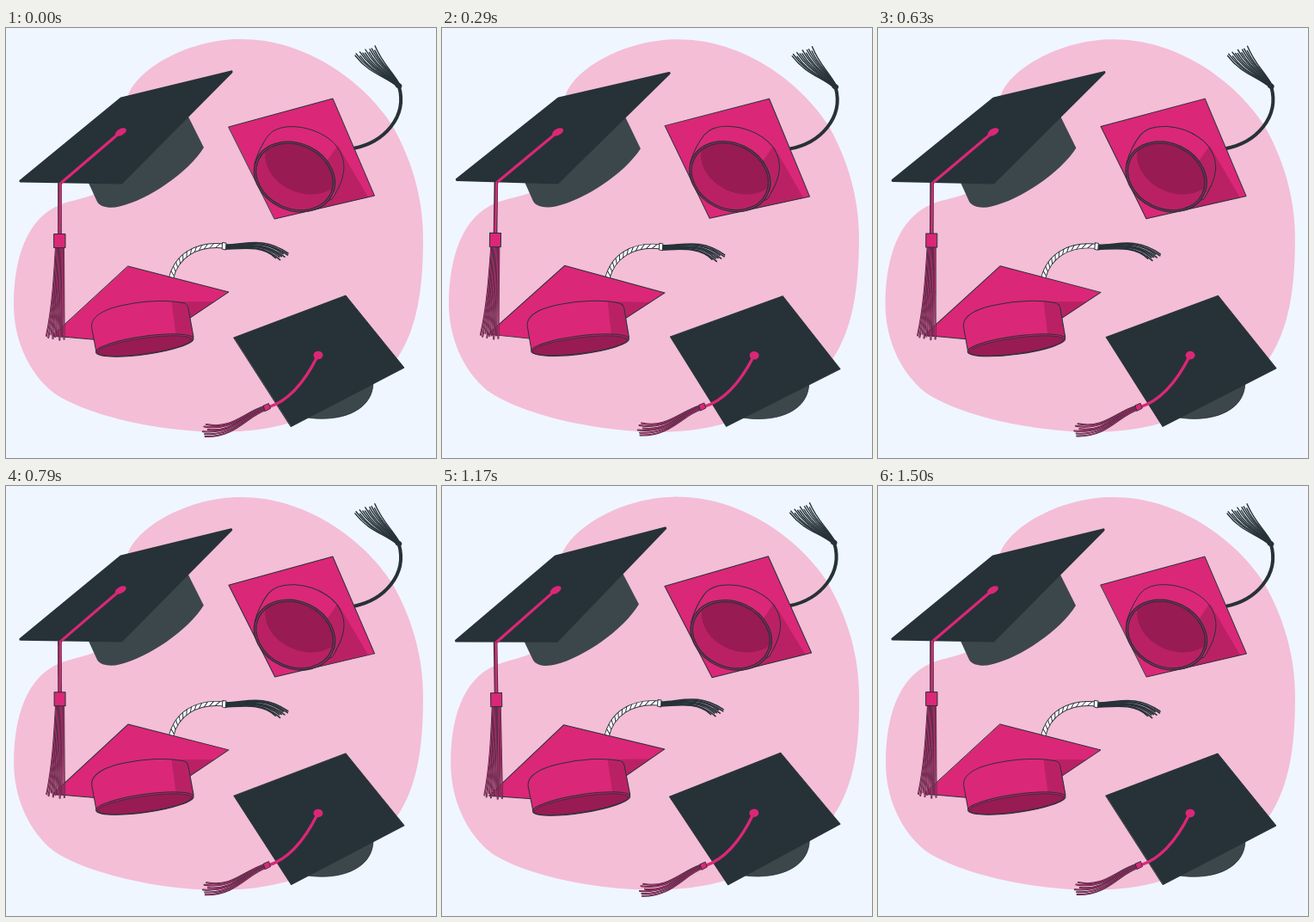
Write an HTML page with a canvas that moves like this. It is 500 px wide and 500 px high and loops after 1540 ms.

```html
<!DOCTYPE html>
<html lang="en">
<head>
<meta charset="utf-8">
<title>Graduation caps</title>
<style>
  html, body { margin: 0; width: 100%; height: 100%; overflow: hidden; background: #eff6ff; }
  canvas { display: block; width: 500px; height: 500px; }
</style>
</head>
<body>
<canvas id="stage" width="500" height="500"></canvas>
<script>
const ctx = document.getElementById('stage').getContext('2d');
const SKY = '#eff6ff', BLOB = '#f4bed6', PINK = '#db2777', SHADE = '#ba2165',
      DEEP = '#991b53', DARK = '#263238', GREY = '#3c474c', WHITE = '#fff';

const FPS = 24, FRAMES = 37, SWING_FRAMES = 36;
const MAX_ANGLE = Math.PI / 180;

function shape(d, fill, stroke, width = 1) {
  const path = new Path2D(d);
  if (fill) { ctx.fillStyle = fill; ctx.fill(path); }
  if (stroke) { ctx.strokeStyle = stroke; ctx.lineWidth = width; ctx.stroke(path); }
}

function oval(x, y, rx, ry, degrees, fill, stroke, width = 1) {
  ctx.beginPath();
  ctx.ellipse(x, y, rx, ry, degrees * Math.PI / 180, 0, 2 * Math.PI);
  if (fill) { ctx.fillStyle = fill; ctx.fill(); }
  if (stroke) { ctx.strokeStyle = stroke; ctx.lineWidth = width; ctx.stroke(); }
}

function clipped(d, draw) {
  ctx.save();
  ctx.clip(new Path2D(d));
  draw();
  ctx.restore();
}

// Strands blend from one cubic edge to another, with uneven tips.
function fringe(count, from, to, ragged, paint) {
  for (let i = 0; i < count; i++) {
    const u = i / (count - 1);
    const p = from.map((v, k) => v + (to[k] - v) * u);
    const stretch = ragged * Math.sin(i * 2.4);
    const dx = p[6] - p[4], dy = p[7] - p[5], len = Math.hypot(dx, dy);
    p[6] += dx / len * stretch;
    p[7] += dy / len * stretch;
    paint(`M${p[0]} ${p[1]}C${p.slice(2).join(' ')}`);
  }
}

function pinkStrand(d) {
  shape(d, null, DARK, 2);
  shape(d, null, PINK, 0.9);
}

function cubic(p, t) {
  const s = 1 - t;
  const at = k => s * s * s * p[k] + 3 * s * s * t * p[k + 2] + 3 * s * t * t * p[k + 4] + t * t * t * p[k + 6];
  return [at(0), at(1)];
}

function rope(p, twists) {
  const d = `M${p[0]} ${p[1]}C${p.slice(2).join(' ')}`;
  shape(d, null, DARK, 6);
  shape(d, null, WHITE, 4.2);
  for (let i = 1; i < twists; i++) {
    const [x0, y0] = cubic(p, (i - 0.35) / twists);
    const [x1, y1] = cubic(p, (i + 0.35) / twists);
    const len = Math.hypot(x1 - x0, y1 - y0);
    const nx = -(y1 - y0) / len * 2.3, ny = (x1 - x0) / len * 2.3;
    shape(`M${x0 + nx} ${y0 + ny}L${x1 - nx} ${y1 - ny}`, null, DARK, 1);
  }
}

function blob() {
  shape('M272 13C345 12 414 59 449 113C476 161 485 205 485 245C485 335 470 412 370 443' +
        'C310 475 235 474 165 462C120 454 78 440 55 424C25 400 9 360 9 322' +
        'C9 268 24 222 62 206C78 199 100 198 118 185C138 160 130 110 142 78C155 45 215 13 272 13Z', BLOB);
}

function bigDarkCap() {
  shape('M95 178L106 202C110 209 122 210 132 207.5C165 200 212 168 230 139L211 101Z', GREY);
  shape('M17 178L134 82L262 51L134 180Z', DARK, DARK, 3.2);
  oval(133.5, 121, 7, 3.8, -28, PINK);
  shape('M132 122L63 181', null, PINK, 3.2);
  shape('M62.5 181V240', null, DARK, 4.6);
  shape('M63 180.5L62.5 240', null, PINK, 2.6);
  fringe(9, [58, 255, 56, 290, 54, 325, 47, 358], [67, 255, 67, 290, 67, 325, 67.5, 361], 2.5, pinkStrand);
  shape('M56 239.5H69V255.5H56Z', PINK, DARK);
}

function openPinkCap() {
  const board = 'M259 115L380 82L428.5 195L312.5 222Z';
  const crown = 'M289 158C292 147 298 134 305 125C318 109 352 113 373 127C391 139 395 157 392 170' +
                'C390 182 384 191 379 199L340 213Z';
  shape('M404 140C440 133 467 103 457 68', null, DARK, 4);
  fringe(12, [455, 68, 441, 56, 422, 53, 406, 32], [458, 66, 449, 50, 438, 42, 430, 23], 2.5,
    d => shape(d, null, DARK, 1.4));
  oval(456.5, 67, 4, 3.2, 30, DARK);
  shape(board, PINK);
  clipped(board, () => shape('M386 137L422 198L350 216Z', SHADE));
  shape(board, null, DARK);
  shape(crown, PINK);
  clipped(crown, () => shape('M386 136L373 155L384 200L400 180Z', SHADE));
  shape(crown, null, DARK);
  oval(335.5, 173, 48.5, 39, 25, SHADE, DARK, 1.3);
  ctx.save();
  ctx.beginPath();
  ctx.ellipse(335.5, 173, 46.3, 37, 25 * Math.PI / 180, 0, 2 * Math.PI);
  ctx.clip();
  oval(347, 155, 47, 37, 22, DEEP);
  ctx.restore();
  oval(335.5, 173, 46.3, 37, 25, null, DARK, 1.3);
}

function lowPinkCap() {
  const board = 'M142 277L259 307L168 368L54 358Z';
  const crown = 'M99.5 347C99 334 117 326 138 322C161 317 188 316 205 319.5C210 320 211.5 323 212 326' +
                'L218 359C218 371 107 388 105 377Z';
  rope([192, 291, 198, 266, 220, 250, 254, 253.5], 13);
  fringe(8, [256, 252, 279, 252, 299, 242, 328, 262], [256, 257, 278, 256, 299, 253, 315, 269], 2.5,
    d => shape(d, null, DARK, 1.6));
  shape('M252 249.5L256 250L255.5 258L251.5 257Z', WHITE, DARK);
  shape(board, PINK);
  clipped(board, () => shape('M192 318H243L200 348Z', SHADE));
  shape(board, null, DARK);
  shape(crown, PINK);
  clipped(crown, () => shape('M192 314L198 360L222 362L214 314Z', SHADE));
  shape(crown, null, DARK);
  oval(161.3, 369, 57.2, 10.6, -8, SHADE, DARK, 1.1);
  oval(161.3, 369.7, 55.6, 9.2, -8, DEEP, DARK, 0.8);
}

function lowDarkCap() {
  shape('M345 452C385 460 427 447 427 412Z', GREY, DARK, 0.8);
  shape('M265 360L395 311L463 395L331.5 463.5Z', DARK, DARK, 1);
  oval(363, 380.5, 5.5, 4.8, 0, PINK);
  shape('M362 382C349 408 331 433 305 441', null, PINK, 3.4);
  fringe(6, [300, 440, 276, 448, 262, 467, 233, 461], [302, 444, 280, 451, 267, 476, 230, 475], 3, pinkStrand);
  shape('M299.5 439L305.5 436.5L307.5 442.5L301.5 445.5Z', PINK, DARK, 0.9);
}

// Each part swings about its own centre; the big cap's tassel hangs in front.
const parts = [
  [blob, 247, 242],
  [openPinkCap, 360, 122],
  [lowPinkCap, 192, 315],
  [bigDarkCap, 139, 206],
  [lowDarkCap, 346, 393]
];

// Linear swing: 0, +1 at a quarter, -1 at three quarters, back to 0.
function swing(phase) {
  if (phase < 0.25) return phase * 4;
  if (phase < 0.75) return 2 - phase * 4;
  return phase * 4 - 4;
}

function render(ms) {
  const frame = Math.floor((ms % 1540 + 5) * FPS / 1000) % FRAMES;
  const angle = MAX_ANGLE * swing(frame % SWING_FRAMES / SWING_FRAMES);
  ctx.fillStyle = SKY;
  ctx.fillRect(0, 0, 500, 500);
  ctx.lineJoin = ctx.lineCap = 'round';
  for (const [draw, x, y] of parts) {
    ctx.save();
    ctx.translate(x, y);
    ctx.rotate(angle);
    ctx.translate(-x, -y);
    draw();
    ctx.restore();
  }
}

const start = performance.now();
function tick() {
  render(performance.now() - start);
  requestAnimationFrame(tick);
}
tick();
</script>
</body>
</html>
```
